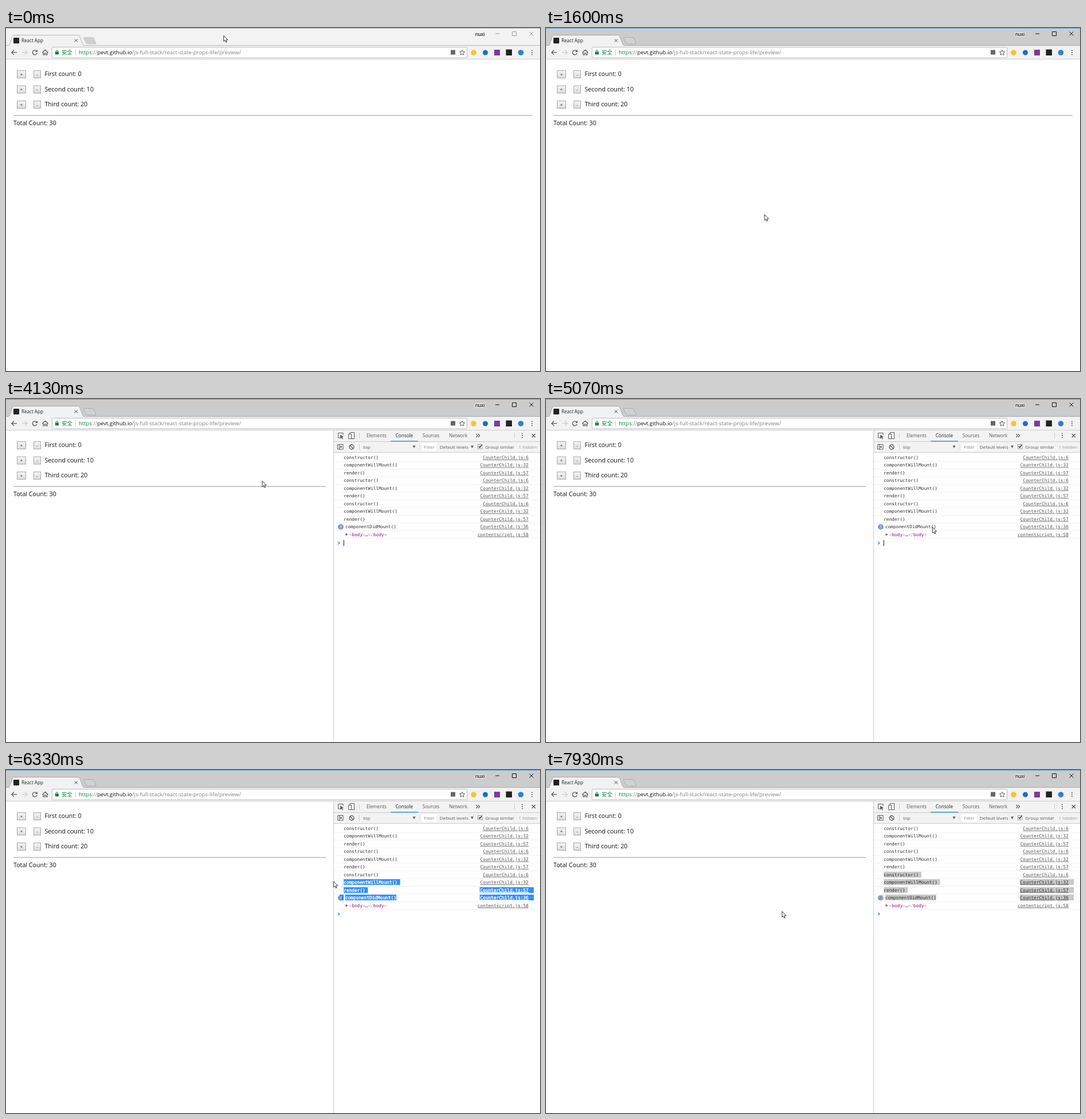
An HTML page for the animation above (8 s loop, 933 by 600 pixels).

```html
<!DOCTYPE html>
<html lang="en">
<head>
<meta charset="utf-8">
<title>React App</title>
<style>
html, body { margin: 0; width: 100%; height: 100%; overflow: hidden; background: #fff; }
svg { display: block; width: 933px; height: 600px; }
text { font-family: "Open Sans", "Noto Sans", sans-serif; white-space: pre; }
.page { font-size: 10.7px; fill: #111; }
.ui { font-size: 8px; fill: #5a5a5a; }
.mono { font: 7.8px "DejaVu Sans Mono", monospace; }
.lit { stroke: #fff; stroke-width: .35; }
.link { text-anchor: end; text-decoration: underline; }
.line { fill: none; stroke: #5a5a5a; stroke-width: 1; }

.timed { opacity: 0; animation: 8s step-end -5ms infinite; }
#cursor { animation: move 8s linear -5ms infinite; }

@keyframes active { 0% { opacity: 0 } 8.375%, 100% { opacity: 1 } }
@keyframes loading { 0%, 20%, 100% { opacity: 0 } 17.5% { opacity: 1 } }
@keyframes panel { 0% { opacity: 0 } 42.5%, 100% { opacity: 1 } }
@keyframes log { 0% { opacity: 0 } 44.125%, 100% { opacity: 1 } }
@keyframes caret { 0%, 53.375%, 66.625%, 100% { opacity: 0 } 46.625%, 60% { opacity: 1 } }
@keyframes didPart { 0%, 73.3%, 100% { opacity: 0 } 72.5% { opacity: 1 } }
@keyframes renderPart { 0%, 74.1%, 100% { opacity: 0 } 73.3% { opacity: 1 } }
@keyframes willPart { 0%, 75%, 100% { opacity: 0 } 74.1% { opacity: 1 } }
@keyframes did { 0%, 99.125%, 100% { opacity: 0 } 73.3% { opacity: 1 } }
@keyframes render { 0%, 99.125%, 100% { opacity: 0 } 74.1% { opacity: 1 } }
@keyframes will { 0%, 99.125%, 100% { opacity: 0 } 75% { opacity: 1 } }
@keyframes ctor { 0%, 99.125%, 100% { opacity: 0 } 85% { opacity: 1 } }
@keyframes blurred { 0% { opacity: 0 } 99.125%, 100% { opacity: 1 } }

/* the pointer is sampled about 15 times a second */
@keyframes move {
  0% { transform: translate(380px, 13px) }
  2.5% { transform: translate(380px, 13px); animation-timing-function: steps(2, start) }
  4.167% { transform: translate(373px, 190px); animation-timing-function: steps(2, start) }
  5.833% { transform: translate(381.5px, 326px) }
  45% { transform: translate(381.5px, 326px); animation-timing-function: steps(9, start) }
  52.5% { transform: translate(447.3px, 143px); animation-timing-function: steps(1, start) }
  53.375% { transform: translate(438px, 150px); animation-timing-function: steps(4, start) }
  56.7% { transform: translate(406px, 190px); animation-timing-function: steps(9, start) }
  64.125% { transform: translate(675px, 224px); animation-timing-function: steps(4, start) }
  67.46% { transform: translate(682px, 224px) }
  72.5% { transform: translate(682px, 224px); animation-timing-function: steps(3, start) }
  75% { transform: translate(590px, 199px); animation-timing-function: steps(8, start) }
  81.67% { transform: translate(566px, 193px) }
  84.125% { transform: translate(566px, 193px); animation-timing-function: steps(3, start) }
  86.67% { transform: translate(580px, 188px); animation-timing-function: steps(2, start) }
  88.33% { transform: translate(582px, 183px) }
  95% { transform: translate(582px, 183px); animation-timing-function: steps(3, start) }
  97.5%, 100% { transform: translate(412px, 247px) }
}
</style>
</head>
<body>
<svg id="stage" viewBox="0 0 933 600"></svg>
<script>
const rect = (x, y, w, h, fill, more = '') =>
  `<rect x="${x}" y="${y}" width="${w}" height="${h}" fill="${fill}" ${more}/>`;
const text = (x, y, s, cls, more = '') => `<text x="${x}" y="${y}" class="${cls}" ${more}>${s}</text>`;
const path = (d, more = '') => `<path d="${d}" class="line" ${more}/>`;
const dot = (x, y, r, fill) => `<circle cx="${x}" cy="${y}" r="${r}" fill="${fill}"/>`;
const timed = (name, body) => `<g class="timed" style="animation-name:${name}">${body}</g>`;
const kebab = (x, y) => [-3.5, 0, 3.5].map(d => dot(x, y + d, 1, '#5a5a5a')).join('');
const ink = color => `style="stroke:${color}"`;

function titleBar(bg, edge, border, newTab, newEdge, button) {
  return rect(0, 0, 933, 31, bg) + rect(0, 0, 933, 1, edge) +
    path('M0 30.5H933', ink(border)) +
    `<path d="M3 31.5C6 31 6 29 7 26L11 15Q12 12.5 14 12.5H126Q128 12.5 129 15L133.5 27Q135 31 138 31.5Z" fill="#f2f2f2" stroke="${border}"/>` +
    rect(3, 31, 136, 2, '#f2f2f2') +
    `<path d="M137 16.5H151Q153 16.5 154 19L157 26Q158 28 156 28H143Q141 28 140 26L135.5 18Q135 16.5 137 16.5Z" fill="${newTab}" stroke="${newEdge}" stroke-width=".8"/>` +
    rect(13, 17, 10, 10, '#222', 'rx="1"') +
    text(27, 24.6, 'React App', '', 'font-size="8.1" fill="#222"') +
    path('M119.8 19.3L125 24.5M125 19.3L119.8 24.5', ink('#444')) +
    text(820, 14, 'nuxi', '', 'font-size="8.2" style="fill:#fff;stroke:#fff;stroke-width:2.4;opacity:.6"') +
    text(820, 14, 'nuxi', '', 'font-size="8.2" style="fill:#111;stroke:#111;stroke-width:.2"') +
    path('M855 10H862M884.5 6.5H891.5V13.5H884.5ZM914.5 6.5L921.5 13.5M921.5 6.5L914.5 13.5', ink(button));
}

function toolbar() {
  return rect(0, 31, 933, 23.5, '#f2f2f2') + rect(0, 54, 933, 1, '#cfcfcf') +
    path('M19 42.7H10M14 38.5L9.8 42.7L14 46.9', 'style="stroke-width:1.3"') +
    path('M28 42.7H37M33 38.5L37.2 42.7L33 46.9', 'style="stroke:#ccc;stroke-width:1.3"') +
    path('M53.5 40.3A4 4 0 1 0 54.2 44', 'style="stroke-width:1.3"') +
    '<path d="M55 38V42H51Z" fill="#5a5a5a"/>' +
    path('M63.3 43L68.5 38.2L73.7 43M65 42.5V47H67.3V44H69.7V47H72V42.5', 'style="stroke-width:1.2"') +
    rect(80.5, 33.5, 725, 18.5, '#fff', 'stroke="#bcbcbc" rx="1.5"') +
    rect(86, 41.5, 6, 4.8, '#0b8043') + path('M87.3 42V40.5A1.7 1.7 0 0 1 90.7 40.5V42', ink('#0b8043')) +
    text(97, 46, '安全', '', 'font-size="9.5" fill="#0b8043" style="font-family:\'Noto Sans CJK SC\',\'Noto Sans CJK\',sans-serif"') +
    rect(121, 38, 1, 10, '#ccc') +
    text(127, 46, '<tspan fill="#0b8043">https</tspan>://<tspan fill="#111">pevt.github.io</tspan>/js-full-stack/react-state-props-life/preview/',
      '', 'font-size="9.52" fill="#808080"') +
    rect(777, 38.5, 8, 8, '#666') +
    path('M797 38.3L798.4 41.4L801.7 41.7L799.2 43.9L800 47.2L797 45.5L794 47.2L794.8 43.9L792.3 41.7L795.6 41.4Z') +
    dot(817, 43, 4.8, '#f7c52b') + dot(837.5, 43, 4.5, '#1c6fbd') +
    rect(853, 38, 10, 10, '#80399c') + rect(873.5, 37.5, 10.5, 10.5, '#222') +
    dot(899.5, 43, 4.8, '#2f7fd6') + kebab(919, 43);
}

const loading = rect(12.5, 16.5, 11, 11, '#f2f2f2') +
  path('M18 18A4.2 4.2 0 1 1 13.8 22.2', 'style="stroke:#4285f4;stroke-width:1.5"') +
  rect(45, 37, 11, 11, '#f2f2f2') +
  path('M47 39L54 46M54 39L47 46', 'style="stroke-width:1.3"') +
  rect(873.5, 37.5, 10.5, 10.5, '#999');

function button(x, y, w, label) {
  return rect(x + .5, y + .5, w - 1, 13, 'url(#face)', 'stroke="#a9a9a9"') +
    text(x + w / 2, y + 9.5, label, '', 'font-size="7.5" fill="#111" text-anchor="middle"');
}

function page() {
  const counts = ['First count: 0', 'Second count: 10', 'Third count: 20'];
  return counts.map((s, i) => {
    const y = 74 + i * 26.5;
    return button(19, y, 16, '+') + button(48, y, 13, '-') + text(67.5, y + 10, s, 'page');
  }).join('') + rect(13, 152.5, 907, 1, '#999') + text(13, 170, 'Total Count: 30', 'page');
}

const devtools = rect(559, 150, 14, 6, '#fff') + rect(572, 55, 361, 545, '#fff') +
  rect(572, 55, 361, 19, '#f3f3f3') + rect(572, 74, 361, 1, '#ccc') + rect(572, 55, 1, 545, '#ccc') +
  path('M589 63V59.5H580.5V68H584') + '<path d="M584 62.5L590 66.5L587.3 67L589 70L587.7 70.5L586.2 67.8L584 69.5Z" fill="#5a5a5a"/>' +
  path('M601 61.5V58.5H608.5V69.5H604M598.5 61.5H603.5V69.5H598.5Z') +
  rect(617, 59, 1, 10, '#ccc') + rect(888, 59, 1, 10, '#ccc') +
  [[630, 'Elements'], [680.7, 'Console'], [727.7, 'Sources'], [774, 'Network']]
    .map(([x, s]) => text(x, 67, s, 'ui', `style="font-size:8.1px${s === 'Console' ? ';fill:#222' : ''}"`)).join('') +
  rect(672, 73, 48, 1.5, '#3a9fd6') +
  path('M821.5 61L824 64L821.5 67M825 61L827.5 64L825 67', 'style="stroke-width:1.2"') +
  kebab(902, 64) + path('M918.8 61L924.8 67M924.8 61L918.8 67', 'style="stroke-width:1.3"');

const lines = ['constructor()', 'componentWillMount()', 'render()'];
const lineNo = [6, 32, 57];
const mid = i => 102.3 + i * 13.47;
const link = i => i === 10 ? 'contentscript.js:58' : 'CounterChild.js:' + (i === 9 ? 36 : lineNo[i % 3]);
const entry = i => i === 9 ? 'componentDidMount()' : lines[i % 3];
const left = i => i === 9 ? 592.7 : 590;
const code = (x, i, s, color, cls = '') => text(x, mid(i) + 2.7, s, 'mono ' + cls, `fill="${color}"`);

function consoleLog() {
  let out = rect(573, 75, 360, 18, '#f3f3f3') + rect(573, 93, 360, 1, '#ccc') +
    path('M579.5 79.5H589V88H579.5ZM582.5 79.5V88') + '<path d="M584 81.5L587.5 83.8L584 86Z" fill="#5a5a5a"/>' +
    '<circle cx="604" cy="84" r="4" class="line" style="stroke-width:1.3"/>' + path('M601.2 81.2L606.8 86.8', 'style="stroke-width:1.3"') +
    rect(617, 79, 1, 10, '#ccc') + rect(722, 79, 1, 10, '#ddd') +
    text(624, 87, 'top', 'ui') + text(757.7, 87, 'Default levels', 'ui') + text(837.3, 87, 'Group similar', 'ui') +
    '<path d="M710.5 81.5H715.5L713 86ZM812 81.5H817L814.5 86Z" fill="#5a5a5a"/>' +
    rect(726.5, 77.5, 26, 13, '#fff') + text(730, 87, 'Filter', 'ui', 'style="fill:#888"') +
    rect(824.5, 79.5, 7.5, 7.5, '#fff', 'stroke="#999"') + path('M826 83L827.8 85L831 80.5', 'style="stroke:#222;stroke-width:1.3"') +
    text(895.5, 87, '1 hidden', 'ui', 'style="fill:#999"');
  for (let i = 0; i < 11; i++) {
    out += rect(573, mid(i) + 6.4, 360, .8, '#eee') + code(913, i, link(i), '#545454', 'link');
    if (i < 10) out += code(left(i), i, entry(i), '#303030');
  }
  const soft = s => `<tspan fill="#a894a6">${s}</tspan>`;
  return out + rect(579.8, 219, 10, 9.5, '#7f98c4', 'rx="4.7"') +
    text(584.8, 226.4, '3', '', 'font-size="7" fill="#fff" text-anchor="middle"') +
    '<path d="M593.5 234.5L597.5 237L593.5 239.5Z" fill="#6e6e6e"/>' +
    code(599.5, 10, `${soft('&lt;')}body${soft('&gt;')}<tspan fill="#303030">…</tspan>${soft('&lt;/')}body${soft('&gt;')}`, '#881280') +
    path('M580 249.7L582.8 252L580 254.3', 'style="stroke:#367cf1;stroke-width:1.3"');
}

const charWidth = 4.696;
const blue = { bg: '#338fff', fg: '#fff', cls: 'lit' };
const grey = { bg: '#c8c8c8', fg: '#303030', cls: '' };
const band = (i, x, end, color) => rect(x, Math.round(mid(i) - 5.3), end - x, 10, color);

// highlights a log line from its nth character on
function pick(i, { bg, fg, cls }, from = 0) {
  const s = entry(i), x = left(i) + from * charWidth;
  const end = left(i) + (s.length + (i < 9 ? 1 : 0)) * charWidth;
  return band(i, x, end, bg) + code(x, i, s.slice(from), fg, cls);
}
const pickLink = (i, { bg, fg, cls }) =>
  band(i, 827.7, 922.2, bg) + code(913, i, link(i), fg, 'link ' + cls);
const pickBadge = c => `<g opacity="${c === grey ? .5 : 1}">${band(9, 583, 590, c.bg)}</g>` +
  text(584.8, 226.4, '3', '', `font-size="7" fill="${c.fg}" text-anchor="middle"`);

const parts = {
  did: c => pickBadge(c) + pick(9, c) + pickLink(9, c),
  render: c => pick(8, c) + pickLink(8, c),
  will: c => pick(7, c),
  ctor: c => pick(6, c) + pickLink(7, c)
};
const selection = timed('didPart', pick(9, blue, 12)) + timed('renderPart', pick(8, blue, 7)) +
  timed('willPart', pick(7, blue, 1)) +
  Object.entries(parts).map(([name, draw]) => timed(name, draw(blue))).join('') +
  timed('blurred', Object.values(parts).map(draw => draw(grey)).join(''));

document.getElementById('stage').innerHTML =
  '<defs><linearGradient id="face" x2="0" y2="1"><stop stop-color="#f4f4f4"/><stop offset="1" stop-color="#dcdcdc"/></linearGradient></defs>' +
  rect(0, 0, 933, 600, '#fff') +
  titleBar('#f3f3f3', '#b4b4b4', '#b8b8b8', '#d0d0d0', '#c2c2c2', '#999') +
  timed('active', titleBar('#cccccc', '#5a9be0', '#a8a8a8', '#d2d2d2', '#a4a4a4', '#111')) +
  toolbar() + timed('loading', loading) + page() +
  timed('panel', devtools) + timed('log', consoleLog()) +
  timed('caret', rect(589.7, 246.6, 1, 10.4, '#111')) + selection +
  '<path id="cursor" d="M.4 .4V10.5L2.7 8.4L4.2 12L5.9 11.3L4.4 7.8H7.6Z" fill="#fff" stroke="#111" stroke-width=".85"/>';
</script>
</body>
</html>
```
